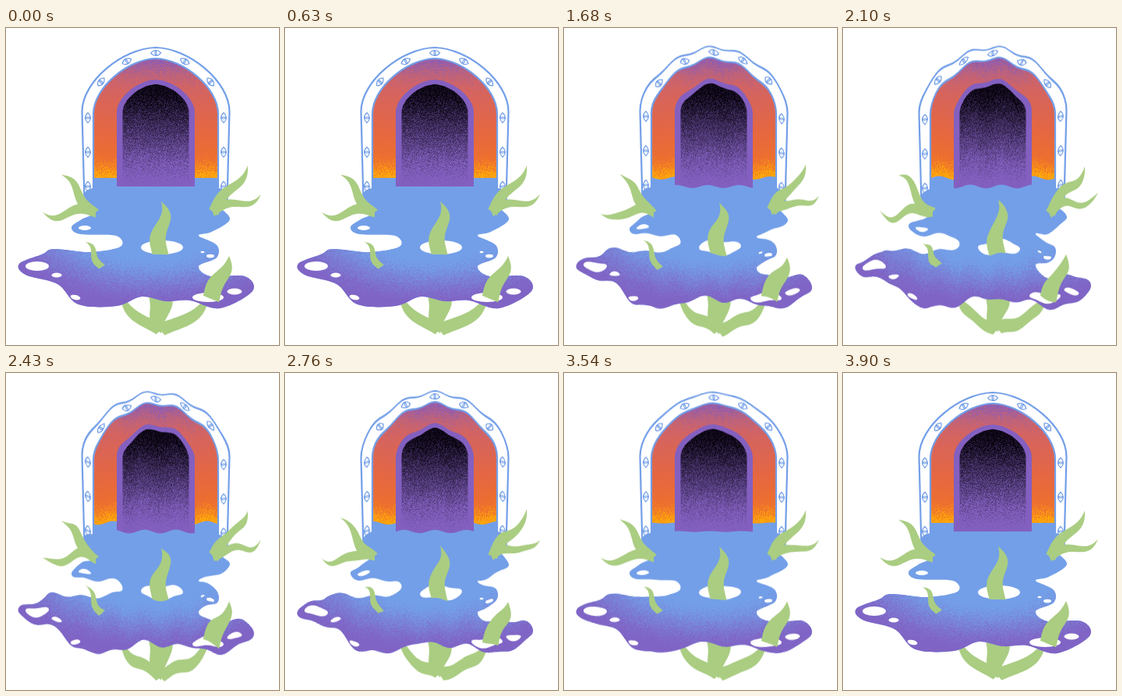
An HTML page with a canvas that plays this animation: 350 px wide and 406 px high, repeating every 4500 ms.

```html
<!DOCTYPE html>
<html>
<head>
<meta charset="utf-8">
<title>Melting doorway</title>
<style>
html, body { margin: 0; width: 350px; height: 406px; overflow: hidden; background: #fff; }
canvas { display: block; }
</style>
</head>
<body>
<canvas id="stage" width="350" height="406"></canvas>
<script>
const W = 350, H = 406, LOOP = 4500, CX = 192, WATERLINE = 192;
const BLUE = '#739fe8', GREEN = '#aacd82', PURPLE = '#8360c0';
const stage = document.getElementById('stage').getContext('2d');
const art = document.createElement('canvas');
art.width = W;
art.height = H;
const g = art.getContext('2d');

let seed = 7;
function random() {
  seed = (seed * 1664525 + 1013904223) % 4294967296;
  return seed / 4294967296;
}
const clamp = v => Math.max(0, Math.min(1, v));

function fill(path, color) {
  g.fillStyle = color;
  g.fill(path);
}

function hole(x, y, rx, ry, tilt = 0) {
  const path = new Path2D();
  path.ellipse(x, y, rx, ry, tilt, 0, 7);
  fill(path, '#fff');
}

// stops: [position, r, g, b] in ascending order
function ramp(stops, t) {
  let i = 1;
  while (i < stops.length - 1 && t > stops[i][0]) i++;
  const a = stops[i - 1], b = stops[i];
  const k = clamp((t - a[0]) / (b[0] - a[0]));
  return `rgb(${[1, 2, 3].map(c => Math.round(a[c] + (b[c] - a[c]) * k))})`;
}

// Grainy gradient inside a path
function grain(path, top, bottom, stops, level, spread) {
  g.save();
  g.clip(path);
  for (let y = top; y < bottom; y++) {
    for (let x = 0; x < W; x++) {
      g.fillStyle = ramp(stops, level(x, y) + (random() - 0.5) * spread);
      g.fillRect(x, y, 1, 1);
    }
  }
  g.restore();
}

// Key points of the left half of an arch, from spring line to apex
const shoulder = (half, spring, apex) => [
  [CX - half, spring],
  [CX - half, spring - 0.47 * (spring - apex)],
  [CX - 0.45 * half, apex + 1],
  [CX, apex]
];

function arch(half, spring, apex, foot, lean = 0) {
  const [a, b, c, d] = shoulder(half, spring, apex);
  const mirror = ([x, y]) => [2 * CX - x, y];
  return new Path2D(`M${CX - half + lean},${foot} L${a} C${b} ${c} ${d}
    C${mirror(c)} ${mirror(b)} ${mirror(a)} L${CX + half - lean},${foot}`);
}

function bezier(p, t) {
  const u = 1 - t;
  return [0, 1].map(k => u * u * u * p[0][k] + 3 * u * u * t * p[1][k] +
    3 * u * t * t * p[2][k] + t * t * t * p[3][k]);
}

function eye(x, y, angle) {
  g.save();
  g.translate(x, y);
  g.rotate(angle);
  g.lineWidth = 1.2;
  g.beginPath();
  g.moveTo(-6.5, 0);
  g.quadraticCurveTo(0, -7, 6.5, 0);
  g.quadraticCurveTo(0, 7, -6.5, 0);
  g.moveTo(1, 0);
  g.ellipse(0, 0, 1, 3, 0, 0, 7);
  g.stroke();
  g.restore();
}

function eyePair(x, y, angle) {
  eye(x, y, angle);
  if (x < CX) eye(2 * CX - x, y, -angle);
}

// Tapering ribbon from base to tip, swaying across its own axis
function weed(x0, y0, x1, y1, width, sway, waves = 1) {
  const dx = x1 - x0, dy = y1 - y0, len = Math.hypot(dx, dy), steps = 24;
  const path = new Path2D();
  const point = (s, side) => {
    const off = sway * Math.sin(2 * Math.PI * waves * s) * (0.5 + s) +
      side * width / 2 * (1 - s ** 3);
    path.lineTo(x0 + dx * s - dy / len * off, y0 + dy * s + dx / len * off);
  };
  for (let i = 0; i <= steps; i++) point(i / steps, 1);
  for (let i = steps; i >= 0; i--) point(i / steps, -1);
  fill(path, GREEN);
}

// Smooth closed curve through "x,y" key points
function blob(text) {
  const pts = text.trim().split(/\s+/).map(s => s.split(',').map(Number));
  const n = pts.length, path = new Path2D();
  path.moveTo(...pts[0]);
  pts.forEach((a, i) => {
    const before = pts[(i + n - 1) % n], b = pts[(i + 1) % n], after = pts[(i + 2) % n];
    path.bezierCurveTo(a[0] + (b[0] - before[0]) / 6, a[1] + (b[1] - before[1]) / 6,
      b[0] - (after[0] - a[0]) / 6, b[1] - (after[1] - a[1]) / 6, ...b);
  });
  return path;
}

function drawWater() {
  const water = blob(`112,205 272,205 272,226 287,245 264,261 247,266 270,278 270,294
    247,305 262,318 306,318 316,337 274,359 236,349 205,350 174,344 142,356 93,354
    66,328 25,316 17,302 46,290 62,283 108,287 147,280 141,266 95,264 84,255 97,245 111,236`);
  water.rect(111.5, WATERLINE, 160.5, 34);
  fill(water, BLUE);
  grain(water, 268, 364, [[0, 115, 159, 232], [1, 128, 100, 197]],
    (x, y) => (Math.hypot((x - 190) / 190, (y - 250) / 95) - 0.55) / 0.45, 0.5);
  hole(101, 256, 8, 3);
  hole(40, 305, 15, 6);
  hole(65, 316.5, 6.5, 3);
  hole(89, 345, 6.5, 3, 0.25);
  hole(200, 281, 27, 9);
  hole(262, 292, 5, 2.3);
  hole(252, 287, 2.5, 1.2);
  hole(259, 345, 20, 6);
  hole(293, 337.5, 9.5, 4);
}

function drawArch() {
  grain(arch(80, 110, 39, WATERLINE), 38, WATERLINE,
    [[0, 140, 92, 180], [0.1, 184, 98, 130], [0.24, 212, 100, 98], [0.6, 229, 103, 66],
      [0.86, 238, 112, 45], [1, 255, 172, 8]],
    (x, y) => (y - 40) / 152, 0.14);
  g.strokeStyle = BLUE;
  g.lineWidth = 2.2;
  g.stroke(arch(94.5, 107, 25, 222, 3));
  g.stroke(arch(80, 110, 39, 224));

  const middle = shoulder(87, 108, 32);
  for (const t of [1, 0.69, 0.37]) {
    const [x, y] = bezier(middle, t), [bx, by] = bezier(middle, t - 0.01);
    eyePair(x, y, Math.atan2(y - by, x - bx));
  }
  for (let i = 0; i < 3; i++) eyePair(CX - 87, 115 + 44 * i, Math.PI / 2);
}

function drawDoor() {
  fill(arch(50, 108, 66, 203), PURPLE);
  grain(arch(42.5, 108, 72, 203), 71, 203, [[0, 8, 3, 14], [1, 131, 96, 192]],
    (x, y) => (y - 80) / 105, 0.45);
}

function drawLowerStems() {
  weed(198, 387, 146, 335, 15, -10, 0.5);
  weed(198, 387, 262, 335, 17, 12, 0.5);
  weed(196, 335, 199, 391, 30, -3);
}

function drawWeeds() {
  weed(114, 237, 71, 188, 13, -4);
  weed(115, 236, 47, 236, 13, 6);
  weed(266, 236, 310, 176, 14, -4);
  weed(265, 236, 327, 213, 11, -5);
  weed(198, 290, 199, 222, 21, -5);
  weed(123, 306, 102, 274, 9, -3);
  weed(263, 347, 286, 292, 22, -3);
}

drawLowerStems();
drawWater();
drawArch();
drawDoor();
drawWeeds();

// A travelling sine, swelling and fading, shifts each column up and down.
const START = 630, END = 3900, LENGTH = 40, PERIOD = 900, HEIGHT = 2.4;
function render(t) {
  const u = clamp((t - START) / (END - START));
  const height = HEIGHT * Math.max(0, Math.sin(Math.PI * u)) ** 1.3;
  stage.fillStyle = '#fff';
  stage.fillRect(0, 0, W, H);
  if (height < 0.01) {
    stage.drawImage(art, 0, 0);
    return;
  }
  const crest = CX + (t - 2760) * LENGTH / PERIOD;
  for (let x = 0; x < W; x++) {
    const dy = -height * Math.cos(2 * Math.PI * (x - crest) / LENGTH);
    stage.drawImage(art, x, 0, 1, H, x, dy, 1, H);
  }
}

const origin = performance.now();
function tick() {
  const t = (performance.now() - origin) % LOOP;
  render(Math.floor(t / 30) * 30);
  requestAnimationFrame(tick);
}
tick();
</script>
</body>
</html>
```
